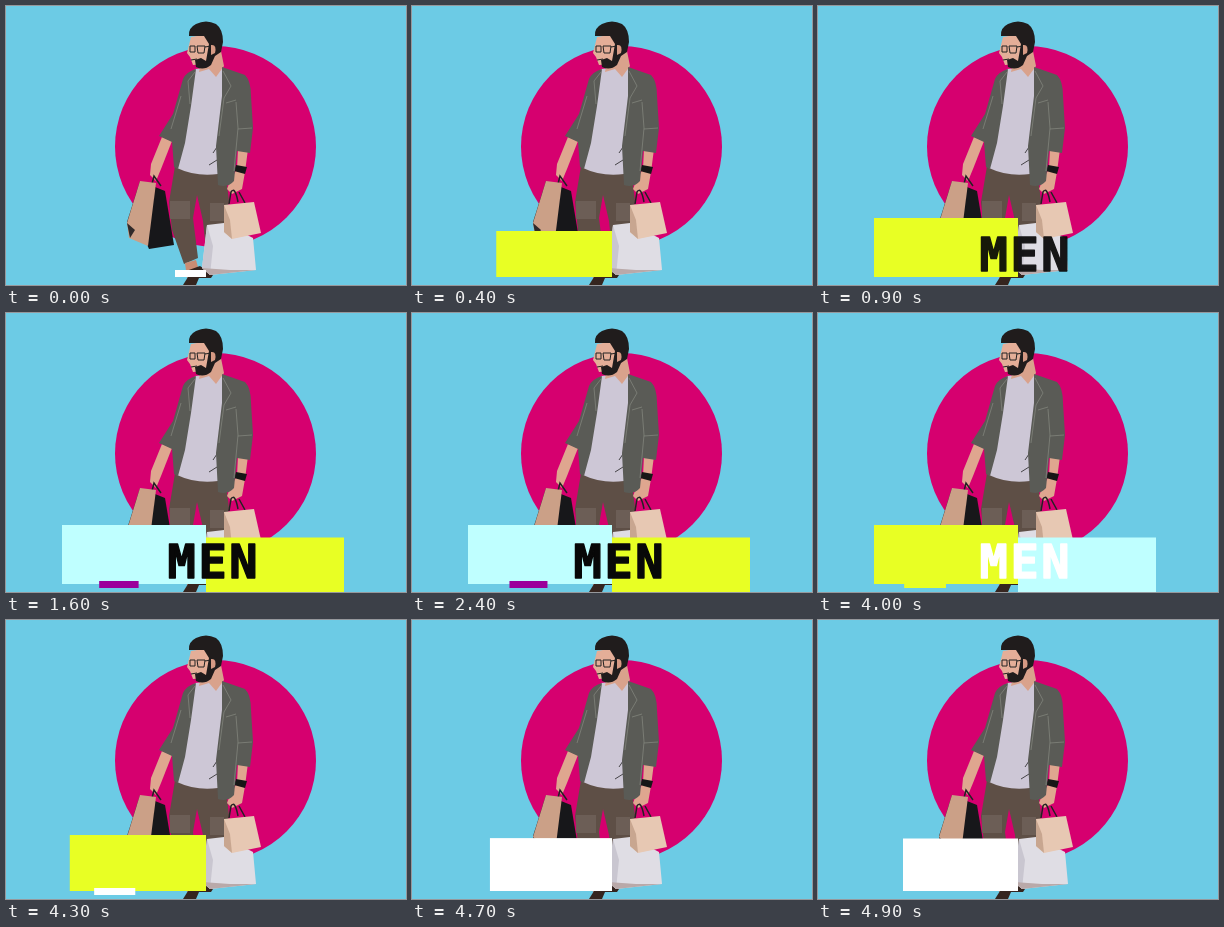
An HTML page for the animation above (5 s loop, 400 by 279 pixels).

```html
<!DOCTYPE html>
<html lang="en">
<head>
<meta charset="utf-8">
<title>Men</title>
<style>
html, body { margin: 0; width: 100%; height: 100%; overflow: hidden; background: #6ccbe5; }
svg { display: block; width: 100%; height: 100%; }
text { font: 700 47px "DejaVu Sans Mono", monospace; letter-spacing: 2.6px; stroke-width: 1.4; stroke-linejoin: round; }
.skin { fill: #dfa68f; }
.jacket { fill: #5a5b56; }
.line { fill: none; stroke: #222; }
</style>
</head>
<body>
<svg viewBox="0 0 400 279">
  <circle cx="209.5" cy="140.5" r="100.5" fill="#d6006f"/>

  <!-- trousers and shoe -->
  <path d="M169 160L219 163 223 195 216 245 200 245 197 215 191 189 187 212 192 252 178 258 166 224 163 196Z" fill="#5e4f46"/>
  <path d="M164 195h20v18h-20zM204 197h14v18h-14z" fill="#6c5e56"/>
  <path d="M179 257L190 254 194 268 181 272Z" fill="#c98c73"/>
  <path d="M180 265L194 260 207 269 205 272 193 272 190 279 177 279 182 271Z" fill="#35251f"/>

  <!-- shirt and neck -->
  <path d="M189 63L217 60 218 90 212 168Q190 171 171 162L178 120Z" fill="#cdc7d6"/>
  <path d="M194 61L215 45 218 60 210 71 203 63 193 66Z" fill="#d9a28c"/>
  <path d="M203 159l8-5M207 147l4-6" class="line" stroke-width=".8"/>

  <!-- arms and watch -->
  <path class="skin" d="M156 131L166 135 155 163 150 175 144 169 145 158Z"/>
  <path class="skin" d="M232 143L242 143 239 166 236 183 226 188 221 183 225 173 231 163Z"/>
  <path d="M230 159L241 161 239 168 228 165Z" fill="#161616"/>

  <!-- jacket -->
  <path class="jacket" d="M190 63Q180 66 177 73L167 108 153 130 166 136 168 161 172 163 179 137 185 100Z"/>
  <path class="jacket" d="M216 61L239 69Q245 75 245 90L247 122 244 147 231 145 228 175Q222 182 212 179L210 140 216 90Z"/>
  <path d="M189 66L182 75 184 98M175 90L165 123M217 65L225 80 218 92 213 130M230 96L232 122 228 165M220 97l10-3M232 123l14-1" fill="none" stroke="#878a82" stroke-width=".7"/>

  <!-- head -->
  <path d="M185 31L203 28 208 46 199 58 187 59 184 51 181 47Z" fill="#e4ae98"/>
  <path d="M183 30Q182 22 190 18 200 13 210 18 217 23 217 36L215 46 209 50 205 59Q198 65 190 61L189 54 195 52 200 55 203 38 198 30Z" fill="#201c1c"/>
  <path d="M205 39q6-1 4 8l-4 2z" fill="#d69a84"/>
  <path d="M184 40h5v6h-5zM191 40h8l-1 7h-6zM199 41l6-1M185 54l6-1" class="line"/>

  <!-- bags -->
  <path d="M146 178L148 170 155 180M223 198L225 186Q229 180 232 196M233 186l6 11" class="line" stroke-width="1.5"/>
  <path d="M149 181L159 185 168 239 143 243 140 236Z" fill="#17171a"/>
  <path d="M134 175L121 216 125 229 132 220Z" fill="#302a2a"/>
  <path d="M134 175L150 177 142 240 123 232 121 217Z" fill="#cba087"/>
  <path d="M121 217L129 224 124 232Z" fill="#302a2a"/>
  <path d="M201 219L218 217 247 232 250 264 204 269 196 262Z" fill="#dfdde4"/>
  <path d="M201 219L207 240 204 269 196 262Z" fill="#c9c6d0"/>
  <path d="M196 262L204 269 250 264 224 264Z" fill="#b9a9a9"/>
  <path d="M218 199L248 196 255 227 226 233 218 226Z" fill="#e7c8b3"/>
  <path d="M218 199L224 214 226 233 218 226Z" fill="#c8a690"/>

  <rect id="right" x="200" y="224.5" height="54.5"/>
  <rect id="left"/>
  <rect id="bar" y="268" height="7"/>
  <text id="word" x="161.5" y="265">MEN</text>
</svg>
<script>
const LOOP = 5000, STEP = 100;
const YELLOW = '#e8ff24', ICE = '#bfffff', PURPLE = '#9b009b', BLACK = '#080808', WHITE = '#fff';
const [left, right, bar, word] = ['left', 'right', 'bar', 'word'].map(id => document.getElementById(id));

const ramp = (t, from, to) => Math.min(1, Math.max(0, (t - from) / (to - from)));
const easeOut = p => 1 - (1 - p) ** 2;
const set = (el, attrs) => { for (const k in attrs) el.setAttribute(k, attrs[k]); };

function draw(t) {
  const grow = easeOut(ramp(t, 0, 800)), shrink = ramp(t, 4080, 4900);
  const closing = 1 - ramp(t, 4000, 4300);
  const main = t >= 1100 && t < 3800, late = t >= 3800;

  // Left panel keeps its lower right corner at (200, 271)
  const width = 31 + 113 * grow - 29 * shrink;
  const height = 7 + 52 * grow - 6.5 * easeOut(shrink);
  set(left, { x: 200 - width, y: 271 - height, width, height,
    fill: main ? ICE : t < 400 || t >= 4600 ? WHITE : YELLOW });

  set(right, { width: 138 * Math.min(easeOut(ramp(t, 900, 1200)), closing), fill: late ? ICE : YELLOW });

  // Small bar drifts right and narrows, then returns
  const drift = 32 * Math.sin(Math.PI * (t - 1950) / 2150) ** 2;
  set(bar, { x: 85.5 + drift, width: 42 - drift / 3,
    opacity: t >= 1200 && t < 4600 ? 1 : 0,
    fill: t >= 4200 ? WHITE : late ? YELLOW : PURPLE });

  const ink = late ? WHITE : BLACK;
  set(word, { fill: ink, stroke: ink, opacity: Math.min(ramp(t, 700, 915), closing) });
}

const start = performance.now();
function tick(now) {
  const t = Math.max(0, now - start) % LOOP;
  draw(Math.floor(t / STEP) * STEP);
  requestAnimationFrame(tick);
}
draw(0);
requestAnimationFrame(tick);
</script>
</body>
</html>
```
